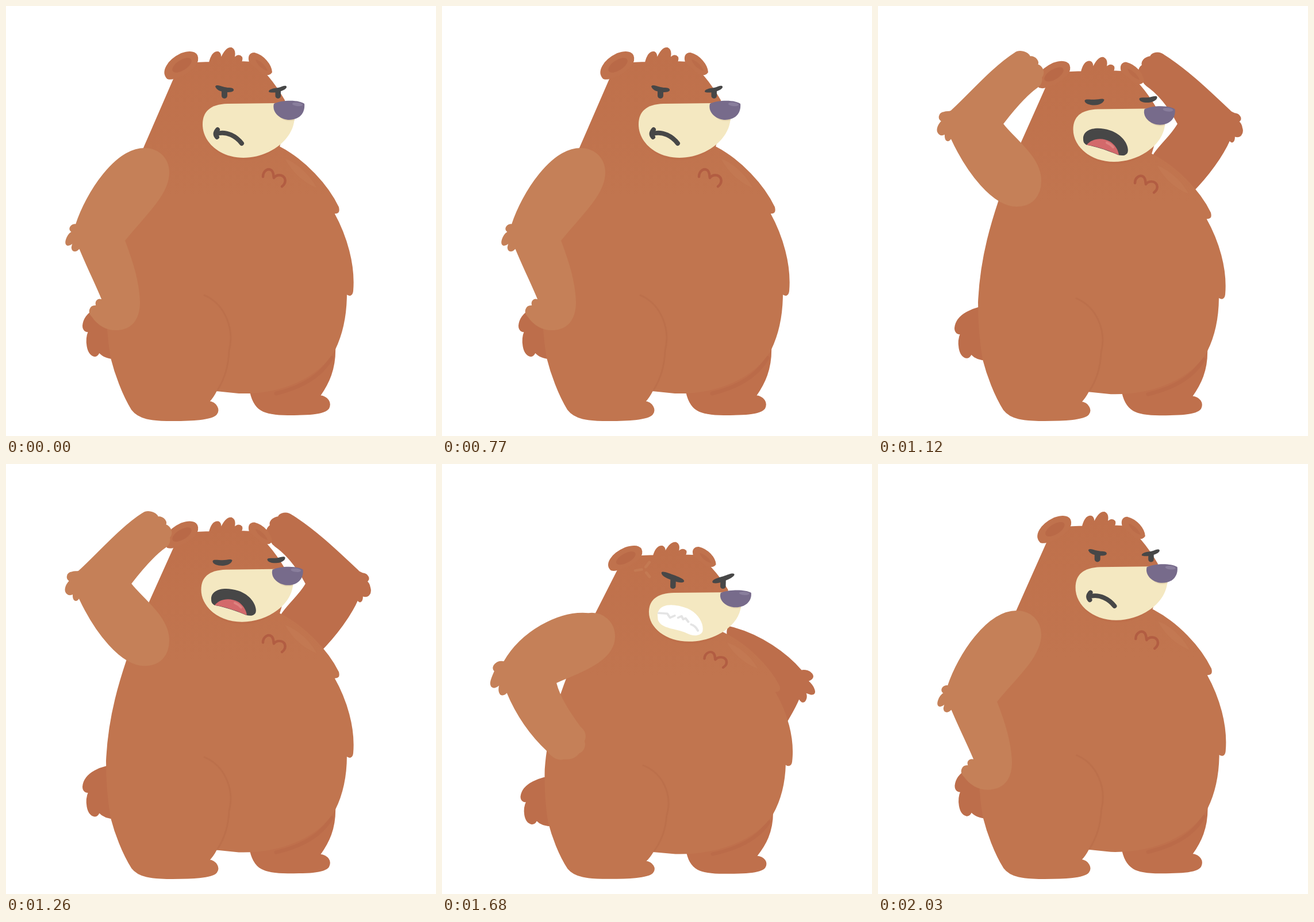
An HTML page for the animation above (2100 ms loop, 748 px wide and 748 px high).

```html
<!DOCTYPE html>
<html lang="en">
<head>
<meta charset="utf-8">
<title>Grumpy bear</title>
<style>
  html, body { margin: 0; width: 100%; height: 100%; overflow: hidden; background: #fff; }
  svg { display: block; width: 100%; height: 100%; }
  .line { fill: none; stroke-linecap: round; stroke-linejoin: round; }
  .dark { fill: #474747; }
  .coat { stroke-width: 2; stroke-linejoin: round; }
  .far { fill: #bd6e4b; stroke: #bd6e4b; }
  .near { fill: #c58058; stroke: #c58058; }
</style>
</head>
<body>
<svg viewBox="0 0 748 748">
  <defs>
    <linearGradient id="fur" gradientUnits="userSpaceOnUse" x1="0" y1="80" x2="0" y2="330">
      <stop offset="0" stop-color="#bf704b"/>
      <stop offset="1" stop-color="#c1754f"/>
    </linearGradient>
  </defs>

  <path id="armR" class="coat far"/>

  <g id="body">
    <path id="tail" class="coat far" d="M200,516 C165,518 136,532 134,556 C134,564 139,567 144,566 C138,580 140,606 154,609 C160,609 161,604 162,602 C168,609 176,613 190,613Z"/>
    <path class="coat" fill="#bf704c" stroke="#bf704c" d="M572,590 C574,632 560,658 546,678 C560,680 566,690 561,700 C553,711 520,711 490,711 C450,711 430,705 424,665 L500,620Z"/>
    <path class="line" stroke="#b96947" stroke-width="7" opacity=".55" d="M566,612 C550,640 520,662 470,674"/>

    <path class="coat" fill="url(#fur)" stroke="url(#fur)" d="M240,247 L293,125 C300,110 310,102 330,99 L354,98 C357,86 362,79 369,80 C374,82 374,88 373,94
      C377,84 384,72 392,73 C399,76 398,86 396,93 C400,86 406,84 410,89 C411,92 410,95 409,97 L428,98
      C450,112 470,140 484,164 L488,200 L475,245 C520,268 560,312 578,350 C580,358 578,361 570,360
      C592,400 607,450 603,496 C602,504 597,505 592,500 C592,540 585,570 572,597 C545,645 480,675 405,673 L366,669
      C362,677 357,684 353,688 C366,690 372,702 366,710 C358,720 320,721 290,721 C252,721 231,718 219,702
      C203,676 190,640 183,612 C177,575 175,545 175,510 C178,440 192,370 240,247Z"/>
    <path class="line" stroke="#b96c49" stroke-width="3" opacity=".55" d="M345,503 C380,518 398,560 388,600 C387,630 378,652 368,668"/>
    <path fill="#c57c55" opacity=".6" d="M486,266 C508,274 530,296 540,316 C520,308 498,290 486,266Z"/>

    <g class="coat" fill="#c0724d" stroke="#c0724d">
      <path d="M281,126 C270,115 280,95 305,83 C325,76 335,82 333,95 C330,107 312,120 293,125 C289,127 284,127 281,126Z"/>
      <path d="M424,98 C421,88 424,82 432,82 C448,86 461,102 462,115 C458,121 452,120 446,117Z"/>
    </g>
    <ellipse fill="#b96947" cx="306" cy="103" rx="19" ry="9" transform="rotate(-33 306 103)"/>
    <path fill="#b96947" opacity=".7" d="M434,93 C443,95 452,104 455,113 C446,110 437,103 434,93Z"/>
    <path id="vein" class="line" stroke="#c47a53" stroke-width="5" d="M323,127 L334,125 M341,120 L347,111 M342,131 L348,139"/>
    <path class="line" stroke="#b25d42" stroke-width="4.5" d="M447,297 C447,287 456,281 462,286 C466,290 465,296 466,299 C470,293 481,292 485,300 C487,306 484,311 480,314"/>

    <g id="face">
      <path fill="#b96947" opacity=".35" d="M345,220 C352,250 380,268 414,268 C440,268 460,257 470,246Z"/>
      <path fill="#f4e8c1" d="M385,170 L470,169 L502,192 C502,233 457,264 413,264 C372,264 342,237 342,206 C342,184 355,171 385,170Z"/>
      <path fill="#e6d6b0" d="M468,180 C474,196 486,203 502,199 L500,185Z"/>
      <path fill="#776b8b" d="M466,170 C480,163 510,163 519,170 C521,186 510,198 493,198 C477,198 462,185 466,170Z"/>
      <ellipse fill="#897e9c" cx="507" cy="171" rx="9" ry="3.2" transform="rotate(6 507 171)"/>

      <g data-mood="grump">
        <path class="dark" d="M364,140 C366,136 372,139 380,141 C388,143 394,141 396,145 C397,149 392,150 384,150 C376,149 367,148 364,140Z"/>
        <path class="dark" d="M457,149 C457,145 465,143 474,142 C481,140 486,137 488,140 C489,144 482,147 476,149 C468,151 458,151 457,149Z"/>
        <rect class="dark" x="375" y="144" width="10" height="17" rx="5"/>
        <rect class="dark" x="468.500" y="144" width="9.500" height="17" rx="4.700"/>
        <path class="line" stroke="#474747" stroke-width="8" d="M368,215 Q362,222 367,228 M367,222 C384,217 401,227 410,239"/>
      </g>

      <g data-mood="shout">
        <path class="dark" d="M362,155 C362,151 371,153 379,153 C386,153 393,150 396,153 C396,158 388,163 379,163 C370,163 362,160 362,155Z"/>
        <path class="dark" d="M457,152 C457,148 466,150 474,149 C480,148 486,145 488,148 C489,153 482,157 475,158 C466,159 458,157 457,152Z"/>
        <g transform="translate(2.500 -8)">
          <path class="dark" d="M357,232 C356,213 380,208 404,216 C428,224 438,246 434,256 C430,262 424,261 418,260 C400,252 380,245 363,242 C359,240 357,237 357,232Z"/>
          <path fill="#d3696b" d="M363,242 C372,230 390,228 404,236 C414,243 418,252 419,260 C405,254 385,245 363,242Z"/>
          <path class="line" stroke="#de8280" stroke-width="4" d="M398,238 Q405,241 409,246"/>
        </g>
      </g>

      <g data-mood="rage">
        <g class="dark" transform="translate(-2 0)">
          <path d="M364,131 C366,127 376,132 384,135 C394,139 403,143 404,147 C404,152 394,150 386,147 C376,143 364,138 364,131Z"/>
          <path d="M453,149 C453,144 462,141 472,138 C482,134 488,131 491,134 C492,138 482,144 474,147 C464,152 454,153 453,149Z"/>
          <rect x="380" y="141" width="9.500" height="21" rx="4.700"/>
          <rect x="467" y="141" width="9.500" height="21" rx="4.700"/>
        </g>
        <path fill="#fff" d="M357,211 C360,190 384,190 409,200 C429,210 439,231 436,245 C432,254 419,254 409,248 C389,238 364,240 358,222Z"/>
        <path class="line" stroke="#e4e4e4" stroke-width="4" d="M359,209 L374,210 L379,218 L387,214 M393,218 L399,215 L402,221 L406,219 L411,226 M416,231 Q424,234 428,243"/>
      </g>
    </g>
  </g>

  <path id="armL" class="coat near"/>
</svg>

<script>
const LOOP = 2100, STEP = 70, GROUND = 720;
const $ = id => document.getElementById(id);
const mix = (a, b, t) => a + (b - a) * t;
const mapPath = (d, fn) => {
  let i = 0;
  return d.replace(/-?\d+(\.\d+)?/g, n => fn(+n, i++));
};
const shift = (d, dx, dy) => mapPath(d, (n, i) => n + (i % 2 ? dy : dx));
const mixPath = (a, b, t) => {
  const to = b.match(/-?\d+(\.\d+)?/g);
  return mapPath(a, (n, i) => mix(n, +to[i], t).toFixed(1));
};

// Every arm outline: upper arm, elbow tufts, forearm, hand, inner side, shoulder.
const left = {
  rest: `M241,248 C190,248 140,325 122,380 C112,380 108,388 115,393 C106,398 100,416 108,416 C113,416 114,412 118,411
    C113,418 114,426 120,426 C124,426 126,422 128,421 C142,455 157,485 168,512 C160,508 154,514 158,522
    C146,520 142,532 150,540 C160,555 175,563 190,563 C218,563 232,545 232,515 C231,480 220,445 206,408
    C235,370 283,330 283,290 C283,265 265,248 241,248Z`,
  head: `M241,348 C200,348 155,290 127,229 C124,236 116,238 117,222 C108,228 102,220 104,212 C106,204 112,200 111,200
    C104,196 106,186 115,185 C120,183 123,185 127,183 C157,156 200,106 238,82 C246,76 260,80 264,88
    C276,88 280,98 277,102 C288,106 290,118 284,124 C286,132 282,138 276,142 C258,155 240,175 217,205
    C235,230 283,262 283,304 C283,330 268,348 241,348Z`,
  hip: `M255,263 C202,258 137,296 108,347 C95,344 84,356 92,363 C88,372 80,388 89,391 C94,392 98,387 101,386
    C98,394 99,404 105,404 C110,404 112,400 113,399 C130,440 155,475 184,502 C192,512 202,518 212,515
    C222,516 232,513 238,505 C246,502 250,492 247,485 C252,472 246,465 240,460 C222,435 205,410 198,383
    C225,369 300,350 300,303 C300,278 280,260 255,263Z`,
  up: `M241,345 C190,340 130,270 92,200 C88,206 80,200 83,190 C72,192 64,184 68,174 C70,168 76,164 76,164
    C66,158 68,150 78,148 C84,146 88,148 92,146 C110,110 130,60 152,28 C158,14 172,8 184,14
    C198,16 202,26 198,32 C210,40 206,54 200,58 C198,66 194,72 188,76 C182,110 180,140 178,172
    C205,200 283,250 283,300 C283,328 268,345 241,345Z`
};
const right = {
  head: `M545,325 C575,295 600,260 612,232 C613,238 620,240 620,226 C630,230 636,222 633,212 C632,206 630,203 627,201
    C634,198 630,188 620,187 C616,185 614,185 612,182 C582,154 542,114 498,86 C488,78 476,82 474,88
    C462,90 458,98 460,103 C450,110 454,122 460,124 C460,132 464,136 468,139 C488,153 507,177 522,205
    C511,225 492,240 480,258 C490,290 520,310 545,325Z`,
  hip: `M500,286 C555,299 601,334 625,362 C640,359 655,374 636,380 C646,388 654,404 642,403 C638,402 634,400 632,400
    C636,408 632,418 626,416 C623,414 622,411 621,410 C615,425 607,438 600,450 C590,470 580,480 570,480
    C560,480 550,470 550,460 C550,450 550,440 552,430 C553,420 554,410 555,400 C555,390 555,380 550,370
    C530,350 510,330 500,310 C495,300 495,290 500,286Z`
};
right.rest = shift(right.hip, -80, 0);
right.up = mapPath(left.up, (n, i) => i % 2 ? n : 695 - n * 0.9);
for (const poses of [left, right]) poses.lift = shift(poses.hip, 0, -4);

// Body height at which each arm pose was laid out.
const height = { rest: 1, head: 0.974, hip: 0.9, lift: 0.9, up: 1.03 };

// time, body height, lean, face x, face y
const bodyKeys = [
  [0, 1, 0, 0, 0], [140, 1.002, 0, 0, -0.5], [420, 1.006, 0, 0, -1.5], [560, 1.005, 0, 0, -1],
  [770, 1, 0, 0, 0], [840, 0.95, 0.01, 2, 2], [910, 0.98, 0.005, 0, 0], [980, 1.03, 0, -2, -5],
  [1050, 1, 0, -2.5, -6], [1120, 0.974, 0, -2.5, -5], [1260, 0.968, 0, -2.5, -4],
  [1330, 0.93, 0.014, 3, 0], [1400, 0.893, 0.0225, 6, 0], [1540, 0.9, 0.0225, 6, 0],
  [1890, 0.904, 0.0225, 7, 0], [1960, 0.945, 0.011, 3, 0], [2030, 0.983, 0.003, 0, 0], [2100, 1, 0, 0, 0]
];

// start time, from pose, to pose, blend
const armKeys = [
  [0, "rest", "rest", 0], [840, "rest", "hip", 0.3], [910, "rest", "hip", 0.9], [980, "up", "up", 0],
  [1050, "up", "head", 0.6], [1120, "head", "head", 0], [1330, "hip", "rest", 0.2],
  [1400, "hip", "hip", 0], [1610, "hip", "lift", 0.5], [1750, "lift", "lift", 0],
  [1960, "hip", "rest", 0.6], [2030, "rest", "rest", 0]
];
const moodKeys = [[0, "grump"], [910, "shout"], [1330, "rage"], [1960, "grump"]];

const current = (keys, t) => keys.filter(k => k[0] <= t).pop();
const moods = document.querySelectorAll("[data-mood]");

function bodyAt(t) {
  const i = bodyKeys.findIndex(k => k[0] > t);
  const a = bodyKeys[i - 1], b = bodyKeys[i];
  return a.map((v, n) => mix(v, b[n], (t - a[0]) / (b[0] - a[0])));
}

function draw(t) {
  const [, tall, lean, fx, fy] = bodyAt(t);
  const [, from, to, blend] = current(armKeys, t);
  const mood = current(moodKeys, t)[1];

  $("body").setAttribute("transform", `matrix(1 0 ${-lean} ${tall} ${GROUND * lean} ${GROUND * (1 - tall)})`);
  $("face").setAttribute("transform", `translate(${fx} ${fy})`);
  $("tail").setAttribute("transform", `translate(0 ${lean * 300})`);

  const s = tall / mix(height[from], height[to], blend);
  for (const [id, poses] of [["armL", left], ["armR", right]]) {
    $(id).setAttribute("d", mixPath(poses[from], poses[to], blend));
    $(id).setAttribute("transform", `matrix(1 0 0 ${s} 0 ${GROUND * (1 - s)})`);
  }
  moods.forEach(m => m.style.display = m.dataset.mood === mood ? "" : "none");
  $("vein").style.display = t >= 1400 && t <= 1680 ? "" : "none";
}

const start = performance.now();
function tick() {
  const t = (performance.now() - start) % LOOP;
  draw(Math.floor(t / STEP) * STEP);
  requestAnimationFrame(tick);
}
tick();
</script>
</body>
</html>
```
